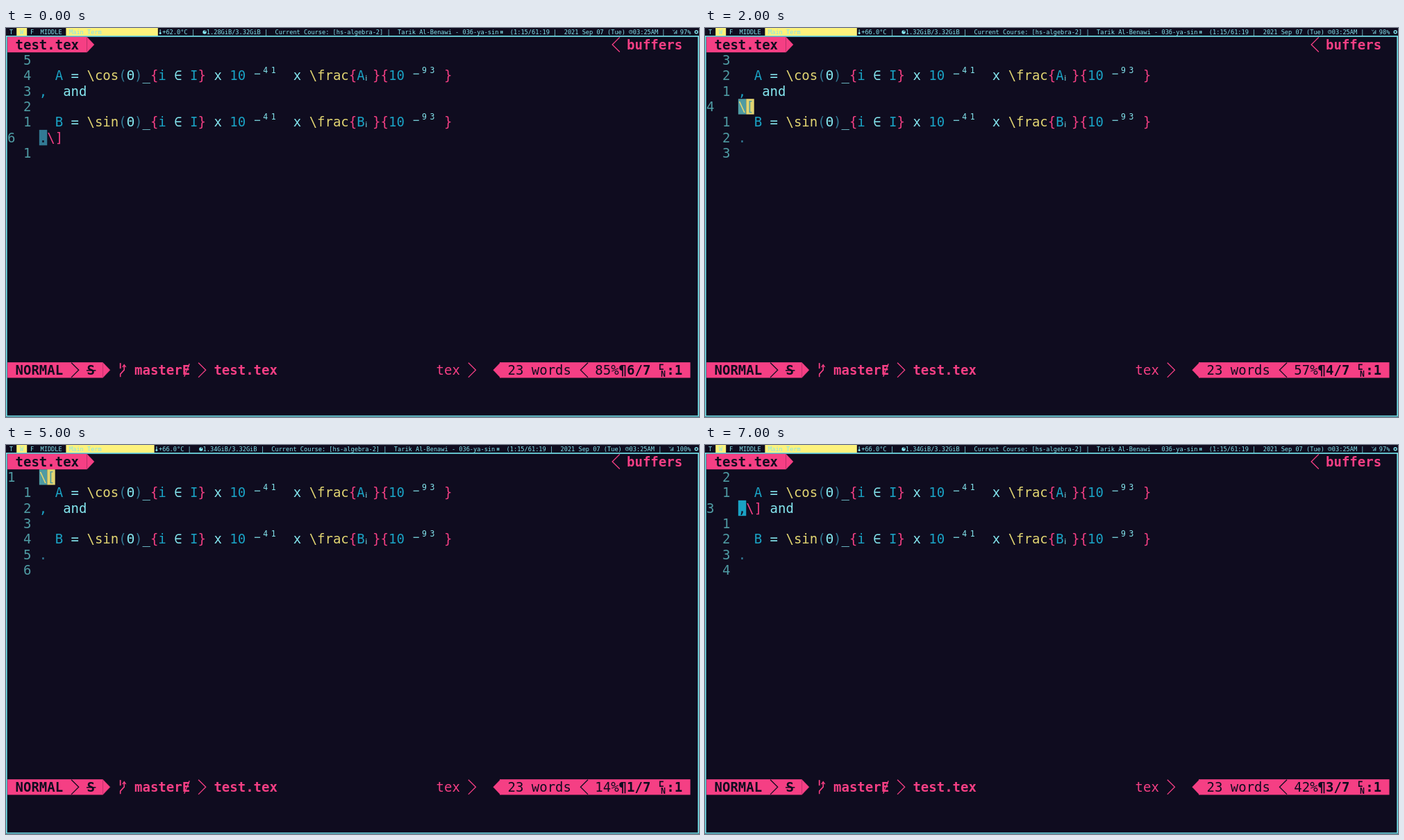
An HTML page with a canvas for the animation above (8 s loop, 998 by 561 pixels).

```html
<!DOCTYPE html>
<html lang="en">
<head>
<meta charset="utf-8">
<title>LaTeX conceal in the terminal</title>
<style>
html, body { margin: 0; width: 100%; height: 100%; overflow: hidden; background: #0f0c1f; }
canvas { display: block; width: 998px; height: 561px; }
</style>
</head>
<body>
<canvas id="stage"></canvas>
<script>
const W = 998, H = 561, STEP = 1000;
const CELL_W = 11.435, CELL_H = 22.35, LEFT = 2.1, TOP = 12.8;
const MONO = '"DejaVu Sans Mono", monospace';
const SANS = '"DejaVu Sans", sans-serif';
const COLOR = {
  bg: '#0f0c1f', p: '#f53f84', y: '#e2d572', c: '#84e5ee', b: '#1aa2c4',
  d: '#327a94', n: '#4f9ba3', bar: '#fdf27c', border: '#72dfe8'
};

// cursor line, temperature, memory, signal
const STATES = [
  [6, '62', '1.28', 97], [5, '62', '1.28', 100], [4, '66', '1.32', 98], [3, '67', '1.32', 94],
  [2, '67', '1.33', 94], [1, '66', '1.34', 100], [2, '66', '1.34', 97], [3, '66', '1.34', 97]
];

const canvas = document.getElementById('stage');
const ctx = canvas.getContext('2d');
const ratio = window.devicePixelRatio || 1;
canvas.width = Math.round(W * ratio);
canvas.height = Math.round(H * ratio);

const colX = col => LEFT + col * CELL_W;
const rowY = row => TOP + row * CELL_H;
const baseline = row => rowY(row) + 17.9;

function fill(color, x, y, w, h) {
  ctx.fillStyle = color;
  ctx.fillRect(x, y, w, h);
}

function label(text, x, y, color, size, bold, family = MONO) {
  ctx.font = `${bold ? 'bold ' : ''}${size}px ${family}`;
  ctx.fillStyle = color;
  ctx.fillText(text, x, y);
}

function write(text, col, row, color, bold) {
  [...text].forEach((ch, i) => label(ch, colX(col + i), baseline(row), color, 18.99, bold));
}

function cells(color, from, to, row) {
  fill(color, colX(from), rowY(row), (to - from) * CELL_W, CELL_H);
}

function line(points, color, width) {
  ctx.beginPath();
  points.forEach(([x, y]) => ctx.lineTo(x, y));
  ctx.strokeStyle = color;
  ctx.lineWidth = width;
  ctx.stroke();
}

// Powerline separators: dir 1 points right, -1 points left.
function separator(col, row, dir, color, solid) {
  const near = dir > 0 ? colX(col) + (solid ? 0 : 0.5) : colX(col + 1) + 1.2;
  const y = rowY(row), inset = solid ? 0 : 0.6;
  const points = [[near, y + inset], [near + dir * (CELL_W - 0.8), y + CELL_H / 2], [near, y + CELL_H - inset]];
  line(points, color, solid ? 0.3 : 1.3);
  if (solid) {
    ctx.fillStyle = color;
    ctx.fill();
  }
}

function superscript(text, col, row) {
  [...text].forEach((ch, i) => {
    const x = colX(col + i);
    if (ch === '-') fill(COLOR.c, x + 1.3, rowY(row) + 8.1, 8.2, 1.2);
    else label(ch, x + 2.3, baseline(row) - 10.2, COLOR.c, 11.4);
  });
}

// Each run is a color key followed by its text; s is superscript, u subscript.
function writeRuns(source, col, row) {
  for (const run of source.split('|')) {
    const kind = run[0], text = run.slice(1);
    if (kind === 's') superscript(text, col, row);
    else if (kind === 'u') label(text, colX(col) + 0.6, baseline(row) + 0.6, COLOR.c, 11, false, SANS);
    else write(text, col, row, COLOR[kind]);
    col += text.length;
  }
}

function equation(name, command, row, active) {
  const open = `b${name}|c = |y${command}|d(|`;
  if (active) {
    writeRuns(open + String.raw`y\Theta|d)|c_|p{|bi |y\in |bI|p}|y \times |b10|c^{|b-41|c}|y \times \frac|p{|b${name}|c_|bi|p}{|b10|c^{|b-93|c}|p}`, 2, row);
    cells(COLOR.b, 1, 2, row);
    // The raised digits leave a sliver above the redrawn row.
    ctx.save();
    ctx.beginPath();
    ctx.rect(colX(47), rowY(row) - 2, 40, 2);
    ctx.clip();
    ctx.globalAlpha = 0.5;
    superscript('93', 48, row);
    ctx.restore();
  } else {
    writeRuns(open + String.raw`cΘ|d)|c_|p{|bi |c∈ |bI|p}|c x |b10 |s-41|c  x |y\frac|p{|b${name}|ui|p}{|b10 |s-93|c |p}`, 2, row);
  }
}

function mathOpen(row) {
  cells(COLOR.n, 4, 5, row);
  cells(COLOR.y, 5, 6, row);
  write('\\', 4, row, COLOR.y);
  write('[', 5, row, COLOR.n);
}

function mathClose(mark, color, row, active) {
  if (active) {
    cells(color, 4, 5, row);
    write('\\]', 5, row, COLOR.p);
  }
  write(mark, 4, row, active ? COLOR.bg : color);
}

function drawBuffer(current) {
  for (let n = 1; n <= 7; n++) {
    write(String(n === current ? n : Math.abs(n - current)), n === current ? 0 : 2, n, COLOR.n);
  }
  if (current === 1 || current === 4) mathOpen(current);
  ctx.save();
  ctx.translate(4 * CELL_W, 0);
  equation('A', '\\cos', 2, current === 2);
  equation('B', '\\sin', 5, current === 5);
  ctx.restore();
  mathClose(',', COLOR.b, 3, current === 3);
  write('and', current === 3 ? 8 : 7, 3, COLOR.c);
  mathClose('.', COLOR.d, 6, current === 6);
}

function drawTabs() {
  cells(COLOR.p, 0, 10, 0);
  separator(10, 0, 1, COLOR.p, true);
  write('test.tex', 1, 0, COLOR.bg, true);
  separator(76, 0, -1, COLOR.p);
  write('buffers', 78, 0, COLOR.p, true);
}

function drawBranch(x, y) {
  line([[x + 2.5, y + 1], [x + 2.5, y + 9]], COLOR.p, 1.8);
  line([[x + 2.5, y + 21], [x + 2.5, y + 17], [x + 8, y + 11], [x + 8, y + 4]], COLOR.p, 1.6);
  line([[x + 5.5, y + 7], [x + 8, y + 3.5], [x + 10.5, y + 7]], COLOR.p, 1.3);
}

function drawStatus(current) {
  const row = 21, y = rowY(row), ink = COLOR.bg;
  cells(COLOR.p, 0, 12, row);
  separator(12, row, 1, COLOR.p, true);
  write('NORMAL', 1, row, ink, true);
  separator(8, row, 1, ink);
  write('S', 10, row, ink, true);
  fill(ink, colX(10) - 0.5, y + 11, CELL_W + 2, 1.5);
  drawBranch(colX(14), y);
  write('masterE', 16, row, COLOR.p, true);
  line([[colX(22) + 3, y + 20.5], [colX(22) + 10.5, y + 2]], COLOR.p, 1.4);
  separator(24, row, 1, COLOR.p);
  write('test.tex', 26, row, COLOR.p, true);
  write('tex', 54, row, COLOR.p);
  separator(58, row, 1, COLOR.p);
  separator(61, row, -1, COLOR.p, true);
  cells(COLOR.p, 62, 86, row);
  write('23 words', 63, row, ink);
  separator(72, row, -1, ink);
  write(`${Math.floor(current / 7 * 100)}%`, 74, row, ink);
  write(`¶${current}/7`, 77, row, ink, true);
  const x = colX(82);
  line([[x + 7, y + 3.3], [x + 2, y + 3.3], [x + 2, y + 10], [x + 7, y + 10]], ink, 1.7);
  label('N', x + 3.3, y + 20.5, ink, 11.5, true);
  write(`:${current === 2 || current === 5 ? 2 : 1}`, 83, row, ink, true);
}

function disc(x, y, r) {
  ctx.beginPath();
  ctx.arc(x, y, r, 0, Math.PI * 2);
}

function drawBarIcons(shift) {
  ctx.save();
  ctx.translate(shift, 0);
  fill(COLOR.c, 221.6, 2, 1, 6);
  disc(222.1, 7.5, 1.5);
  ctx.fill();
  disc(286, 6, 2.7);
  ctx.fill();
  fill(COLOR.bg, 286, 3.8, 1.3, 1.6);
  fill(COLOR.c, 712.2, 4, 1.2, 4);
  fill(COLOR.c, 714.2, 4, 1.2, 4);
  ctx.strokeStyle = COLOR.c;
  ctx.lineWidth = 0.7;
  disc(899.8, 5.6, 2.4);
  ctx.stroke();
  line([[899.8, 4], [899.8, 5.7], [901, 5.7]], COLOR.c, 0.6);
  for (let i = 0; i < 3; i++) fill(COLOR.c, 962 + i * 1.7, 6.5 - i * 1.8, 0.9, 2 + i * 1.8);
  line([[960, 2.5], [961.5, 4.5], [963, 2.5]], COLOR.c, 0.6);
  ctx.restore();
  ctx.strokeStyle = COLOR.c;
  ctx.lineWidth = 1.4;
  disc(994.2, 5.8, 2);
  ctx.stroke();
}

function drawBar([, temp, memory, signal]) {
  const shift = signal === 100 ? -5.2 : 0;
  const put = (text, x) => label(text, x, 8.5, COLOR.c, 8.64);
  fill(COLOR.bar, 15.2, 0, 15, 11);
  fill(COLOR.bar, 86.4, 0, 132.4 + shift, 11);
  put('T', 4.9);
  put('W', 20);
  put('F', 35);
  put('MIDDLE', 49.5);
  put('Main Term', 91);
  put(`+${temp}.0°C |`, 225.2 + shift);
  put(`${memory}GiB/3.32GiB |  Current Course: [hs-algebra-2] |  Tarik Al-Benawi - 036-ya-sin`, 288.8 + shift);
  put('(1:15/61:19 |  2021 Sep 07 (Tue)', 725.8 + shift);
  put('03:25AM |', 902.8 + shift);
  put(`${signal}%`, 970.8 + shift);
  drawBarIcons(shift);
}

function draw(time) {
  const state = STATES[Math.floor(time / STEP) % STATES.length];
  ctx.setTransform(ratio, 0, 0, ratio, 0, 0);
  fill(COLOR.bg, 0, 0, W, H);
  drawBar(state);
  ctx.strokeStyle = COLOR.border;
  ctx.lineWidth = 1.7;
  ctx.strokeRect(0.8, 11.9, 996.4, 547.8);
  drawTabs();
  drawBuffer(state[0]);
  drawStatus(state[0]);
}

const start = performance.now();
function tick() {
  draw(performance.now() - start);
  requestAnimationFrame(tick);
}
tick();
</script>
</body>
</html>
```
